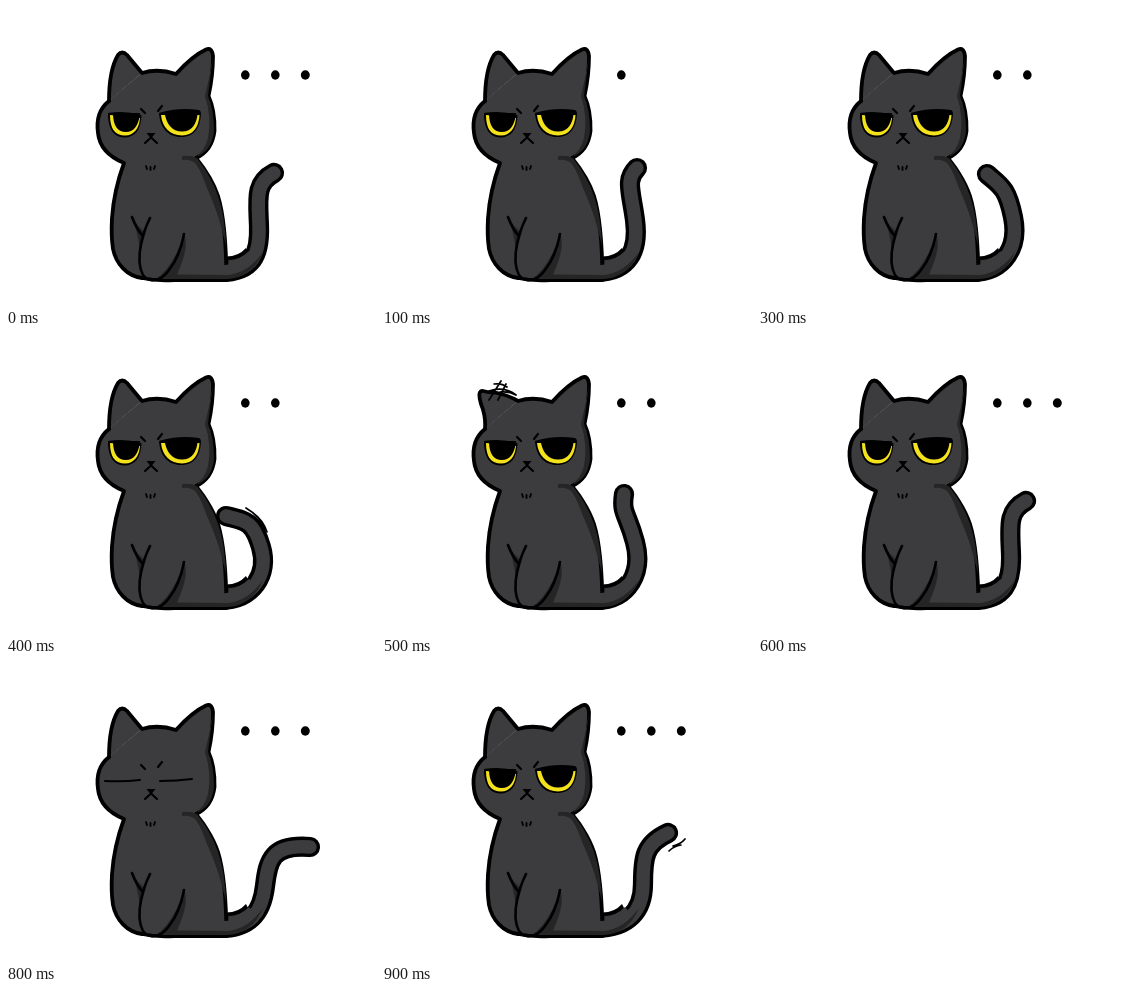
Recreate the animation shown at these times as an HTML page without scripts. Size 370 by 300 pixels, loop 1000 ms.

```html
<!DOCTYPE html>
<html lang="en">
<head>
<meta charset="utf-8">
<title>Grumpy cat</title>
<style>
html, body { margin: 0; width: 100%; height: 100%; overflow: hidden; background: #fff; }
svg { display: block; width: 370px; height: 300px; }
path { stroke-linecap: round; stroke-linejoin: round; }

.line { fill: none; stroke: #000; }
.fur { fill: #3c3c3e; stroke: #000; stroke-width: 3.8; }
.skin { fill: #3c3c3e; }
.iris { fill: #f4e31c; }
.shade { fill: #252526; }
.tail { fill: none; stroke: #3c3c3e; stroke-width: 13.4; animation: wag 1s step-end infinite; }
.tail.edge { stroke: #000; stroke-width: 20.2; }

/* --n is the 100 ms step in which the part shows (or hides) */
.flash, .hide { animation: flash 1s calc((var(--n) - 10) * .1s) step-end infinite; }
.hide { animation-name: hide; }
.two { animation: two 1s step-end infinite; }
.three { animation: three 1s step-end infinite; }

@keyframes flash { 0% { opacity: 1 } 10%, 100% { opacity: 0 } }
@keyframes hide { 0% { opacity: 0 } 10%, 100% { opacity: 1 } }
@keyframes two { 0%, 30%, 100% { opacity: 1 } 10% { opacity: 0 } }
@keyframes three { 0%, 60%, 100% { opacity: 1 } 10% { opacity: 0 } }
@keyframes wag {
  0%, 60%, 100% { d: path("M214 266C247 266 254 248 253 220S249 177 268 167") }
  10% { d: path("M214 266C247 266 257 244 253 214S243 174 255 162") }
  20%, 50% { d: path("M214 266C247 266 261 238 253 208S239 180 242 160") }
  30% { d: path("M214 266C247 266 261 240 255 211S243 180 229 168") }
  40% { d: path("M214 266C247 266 263 240 255 213S239 187 220 182") }
  70% { d: path("M214 266C247 266 258 246 257 218S258 180 284 176") }
  80% { d: path("M214 266C245 266 256 250 259 224S266 182 304 185") }
  90% { d: path("M214 266C247 266 261 248 261 222S262 182 286 171") }
}
</style>
</head>
<body>
<svg viewBox="0 0 370 300">
  <path class="tail edge" d="M214 266C247 266 254 248 253 220S249 177 268 167"/>
  <path d="M219 250.500Q232 251 240 242L244 250Q236 262 219 262Z"/>

  <path class="fur" d="M136 67Q152 62 170 68Q186 50 200 43.500Q206 41 207 50Q207 70 202.500 90Q209 104 208.500 125Q206 145 190 152Q206 172 212 190Q220 215 220.500 274L168 274Q150 275 136 272C121 270 110 258 107 243Q105 230 106 212Q108 184 118 157Q94 147 92 127Q89 106 103 95"/>
  <path class="tail" d="M214 266C247 266 254 248 253 220S249 177 268 167"/>
  <path class="skin" d="M222.500 254Q234 254 243 245L249 252Q238 264 222 264Z"/>

  <path class="fur hide" style="--n:5" d="M103 95Q103 64 112 49Q116 44 121 49L136 67"/>
  <path class="fur flash" style="--n:5" d="M103 95Q104 82 99 70Q95 56 101 57Q109 59 113 58.500Q126 61 136 67"/>
  <path class="skin" d="M105 93L135 68L142 75L112 100Z"/>

  <g class="shade">
    <path d="M207 50Q204 70 199 90Q206 112 202 132Q199 144 190 151Q206 145 208 125Q208 104 202 90Z"/>
    <path d="M176 150Q184 149 191 152Q206 172 212 190Q219 210 220 240Q213 208 201 182Q193 160 188 156Q182 153 176 154Z"/>
    <path d="M126 211Q132 222 140 226L134 246Q132 226 126 211Z"/>
    <path d="M178 228Q184 240 171 268.500L222 269Q242 267 257 246Q247 271 222 273L150 273Q168 260 178 228Z"/>
  </g>
  <path class="line" stroke-width="2.6" d="M126 211Q131 224 137 230M144 212Q138 224 135 238Q131 258 137 269Q141 275 148 274M178 228Q174 250 163 264Q156 274 148 274"/>

  <g class="hide" style="--n:8">
    <path d="M102 107Q118 104 135.500 109C135 124 129 131.500 118 131.500C108 131 102 124 102 107Z"/>
    <path class="iris" d="M104 109C104 123 109 129.500 119 129.500C128 129.500 133.500 122 134 112Z"/>
    <path d="M107 107C107 119 111 126 120 126C128 126 133 119 134 107Z"/>
    <path d="M153 107Q172 101 193 104Q195 105 195 108C194 122 188 131 175 131C162 131 154 122 153 107Z"/>
    <path class="iris" d="M155 109C156 121 164 129.500 176 129.500C187 129.500 193 121 193.500 109Z"/>
    <path d="M158.500 106C160 118 166 125.500 176 125.500C186 125.500 191 118 192 105Z"/>
  </g>
  <path class="line flash" style="--n:8" stroke-width="2" d="M99 119Q117 120 134 118M154 119Q171 119 186 117"/>

  <path class="line" stroke-width="2.2" d="M135 103L139 107M156 100L152 105M139 137L145 131.500L151 137"/>
  <path d="M140.500 127H149.500L145 132.500Z"/>
  <path class="line" stroke-width="1.8" d="M140 160L141 163M144.500 161V164M149 160L148 163"/>

  <g class="line" stroke-width="1.7">
    <path class="flash" style="--n:2" stroke-width="1.2" d="M254.500 155Q257.500 158 255.500 163"/>
    <path class="flash" style="--n:4" d="M240 174Q254 182 259 196M247 179Q257 186 261 198"/>
    <path class="flash" style="--n:5" d="M119 47L107 66M124 50L116 66M112 50Q120 49 125 53M107 57Q122 52 134 61M118 58Q127 57 134 61"/>
    <path class="flash" style="--n:7" d="M251 169Q254 164 259 162M249 184Q253 172 263 167"/>
    <path class="flash" style="--n:9" d="M287 189Q292 184 299 183M291 184Q299 182 303 177"/>
  </g>

  <ellipse cx="239.300" cy="69" rx="4.300" ry="4.700"/>
  <ellipse class="two" cx="269.300" cy="69" rx="4.300" ry="4.700"/>
  <ellipse class="three" cx="299.300" cy="69" rx="4.500" ry="4.700"/>
</svg>
</body>
</html>
```
